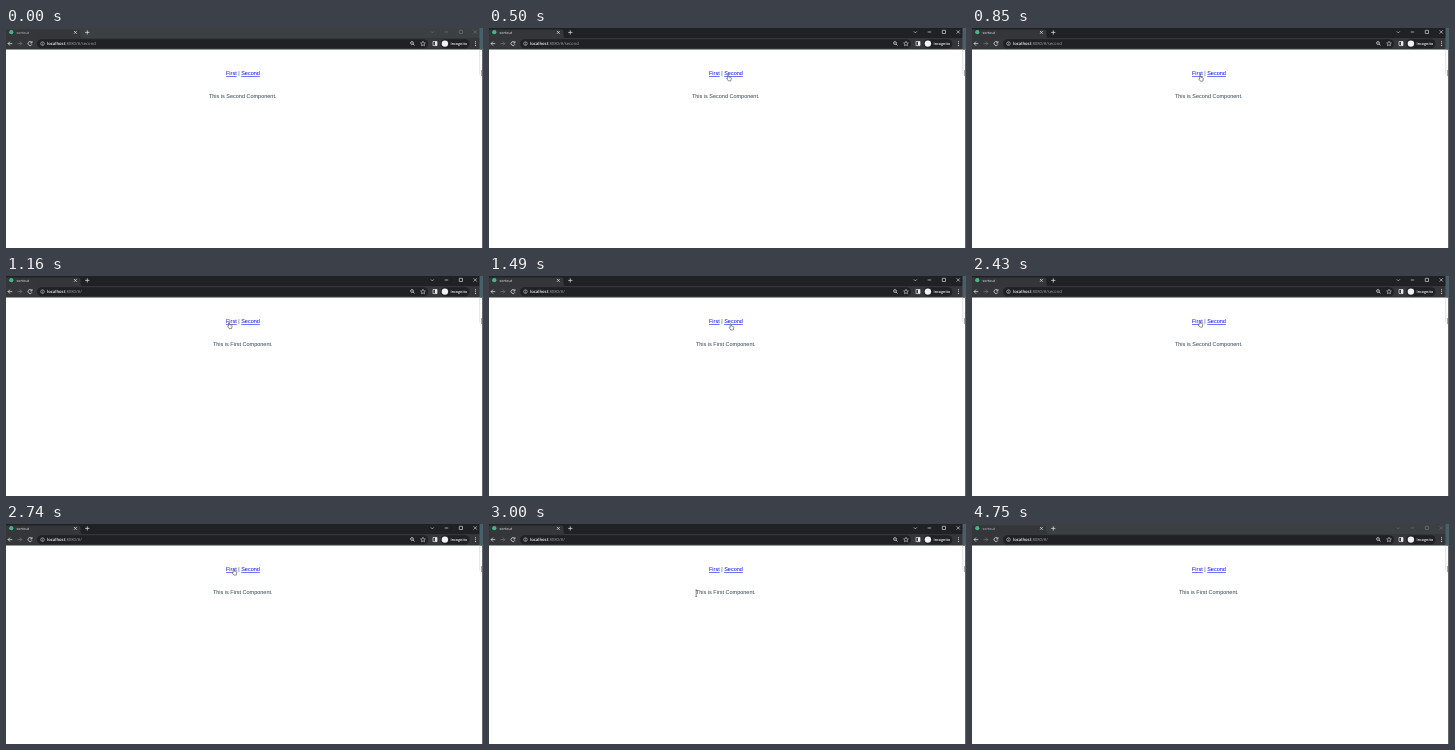
An HTML page that plays this animation: 477x220 px, repeating every 8000 ms.

```html
<!DOCTYPE html>
<html>
<head>
<meta charset="utf-8">
<style>
  html, body { margin: 0; width: 100%; height: 100%; overflow: hidden; background: #fff; }
  svg { display: block; width: 477px; height: 220px; }
  text { white-space: pre; text-rendering: geometricPrecision; }
  .ui { font-family: "Open Sans", "Noto Sans", sans-serif; }
  .strong { font-weight: 600; fill: #f1f3f4; }
  .page { font: 5.5px "Liberation Sans", Arial, sans-serif; fill: #2c3e50; }
  .link { text-decoration: underline .7px; text-underline-offset: .5px; }
  .line { fill: none; stroke: #e8eaed; stroke-width: .7; }
  .dim { stroke: #777a7e; }
  #cursor path { fill: #fff; stroke: #444; stroke-width: .6; stroke-linejoin: round; }
</style>
</head>
<body>
<svg viewBox="0 0 477 220">
  <rect width="477" height="220" fill="#fff"/>
  <!-- Tab strip -->
  <rect id="strip" width="477" height="10"/>
  <path d="M0 10V1.5H72Q74.5 1.5 74.5 4V8Q74.5 10 77 10Z" fill="#35363a"/>
  <circle cx="5.3" cy="4.2" r="2.1" fill="#41b883"/>
  <text id="title" class="ui" x="10.5" y="5.5" font-size="3.7">sortout</text>
  <path class="line" d="M68 3l2.8 2.8m0-2.8l-2.8 2.8M79.2 4.4h4.2m-2.1-2.1v4.2"/>
  <path id="controls" class="line" d="M424.8 3.4l1.5 1.5 1.5-1.5M438.6 4h3.6M453.3 2.3h3.2v3.2h-3.2zM467.6 2.3l3.3 3.3m0-3.3l-3.3 3.3"/>
  <!-- Toolbar -->
  <rect y="10" width="477" height="11.5" fill="#35363a"/>
  <rect x="31" y="11.2" width="391" height="9" rx="4.5" fill="#202124"/>
  <path class="line" d="M6.3 15.6H2m2-2l-2 2 2 2"/>
  <path class="line dim" d="M11.5 15.6h4.3m-2-2l2 2-2 2"/>
  <path class="line" d="M25.6 14.3a2 2 0 1 0 .3 2M26 13.2v1.7h-1.7"/>
  <g class="line" style="stroke-width:.5">
    <circle cx="36.5" cy="15.6" r="1.8"/>
    <path d="M36.5 15.3v1.3m0-2.3v.4"/>
  </g>
  <text class="ui" x="41" y="17.1" font-size="4.2"><tspan class="strong">localhost</tspan><tspan id="url" fill="#9aa0a6"></tspan></text>
  <g class="line">
    <circle cx="406" cy="15" r="1.4"/>
    <path d="M407 16l1.5 1.5"/>
    <path style="stroke-width:.5" d="M417 13.2l.7 1.6 1.7.2-1.3 1.1.4 1.7-1.5-.9-1.5.9.4-1.7-1.3-1.1 1.7-.2z"/>
    <path d="M427 13.5h4v4.1h-4z"/>
  </g>
  <rect x="429" y="13.5" width="2" height="4.1" fill="#e8eaed"/>
  <rect x="434.5" y="11.2" width="29" height="9" rx="4.5" fill="#202124"/>
  <circle cx="438.9" cy="15.6" r="3.2" fill="#f1f3f4"/>
  <text class="ui strong" x="444.5" y="16.8" font-size="3.7">Incognito</text>
  <path d="M469 13.3h.9v.9h-.9zm0 1.9h.9v.9h-.9zm0 1.9h.9v.9h-.9z" fill="#e8eaed"/>
  <!-- Window edge -->
  <rect x="473.5" width="3.5" height="21.5" fill="#4a6068"/>
  <rect x="473.5" y="21.5" width=".7" height="25" fill="#d4d4d4"/>
  <rect x="475" y="42" width="1" height="6" fill="#a8a8a8"/>
  <rect x="476" y="21.5" width="1" height="198.5" fill="#66686c"/>
  <g class="page">
    <text x="220" y="47"><tspan id="first" class="link">First</tspan> | <tspan id="second" class="link">Second</tspan></text>
    <text id="message" x="236.7" y="70.3" text-anchor="middle"></text>
  </g>
  <g id="cursor"><path/></g>
</svg>
<script>
const LOOP = 8000, FOCUS = 500, BLUR = 4750;
const el = id => document.getElementById(id);
const shapes = {
  hand: 'M1.2 .8Q1.7 0 2.2 .8V2.6L4.3 3.1Q4.9 3.3 4.8 4L4.3 6.6H1.9L.2 4.4Q.3 3.6 1.2 4.1Z',
  arrow: 'M0 0V5.4L1.3 4.2 2.2 6.2 3 5.8 2.1 3.9H3.8Z',
  beam: 'M0 0H1.8M0 6.4H1.8M.9 0V6.4'
};
// Pointer stops: time, x, y, shape; each holds until the next
const stops = [
  [500, 237.5, 46.3, 'hand'], [570, 237.3, 46.5, 'hand'], [660, 235.5, 46.8, 'hand'],
  [740, 231.5, 46.8, 'arrow'], [820, 226.5, 46.6, 'hand'], [910, 223, 46.3, 'hand'],
  [990, 221.3, 46, 'hand'], [1410, 232, 47, 'arrow'], [1490, 240, 47.4, 'hand'],
  [1760, 241.5, 46.5, 'hand'], [1840, 242, 46, 'hand'], [2190, 239, 45.6, 'hand'],
  [2270, 233, 45.2, 'arrow'], [2350, 228, 44.8, 'hand'], [2430, 226, 44.5, 'hand'],
  [2920, 216, 57, 'arrow'], [3000, 206.3, 66, 'beam']
];
// Route changes: press time, release time, link
const clicks = [[1080, 1160, 'First'], [1920, 2000, 'Second'], [2670, 2740, 'First']];

function draw(t) {
  const active = t >= FOCUS && t < BLUR;
  el('strip').setAttribute('fill', active ? '#202124' : '#3c4043');
  el('title').setAttribute('fill', active ? '#e8eaed' : '#bdc1c6');
  el('controls').style.stroke = active ? '#cdd0d4' : '#6b6e72';

  const done = clicks.filter(c => t >= c[1]).pop();
  const route = done ? done[2] : 'Second';
  const pressed = clicks.find(c => t >= c[0] && t < c[1]);
  for (const name of ['First', 'Second'])
    el(name.toLowerCase()).style.fill = pressed && pressed[2] === name ? '#f00' : '#00e';
  el('url').textContent = ':8080/#/' + (route === 'Second' ? 'second' : '');
  el('message').textContent = `This is ${route} Component.`;

  el('cursor').style.display = active ? '' : 'none';
  if (active) {
    const [, x, y, shape] = stops.filter(s => t >= s[0]).pop();
    el('cursor').setAttribute('transform', `translate(${x} ${y})`);
    el('cursor').firstChild.setAttribute('d', shapes[shape]);
  }
}

const start = performance.now();
function tick() {
  draw((performance.now() - start) % LOOP);
  requestAnimationFrame(tick);
}
tick();
</script>
</body>
</html>
```
